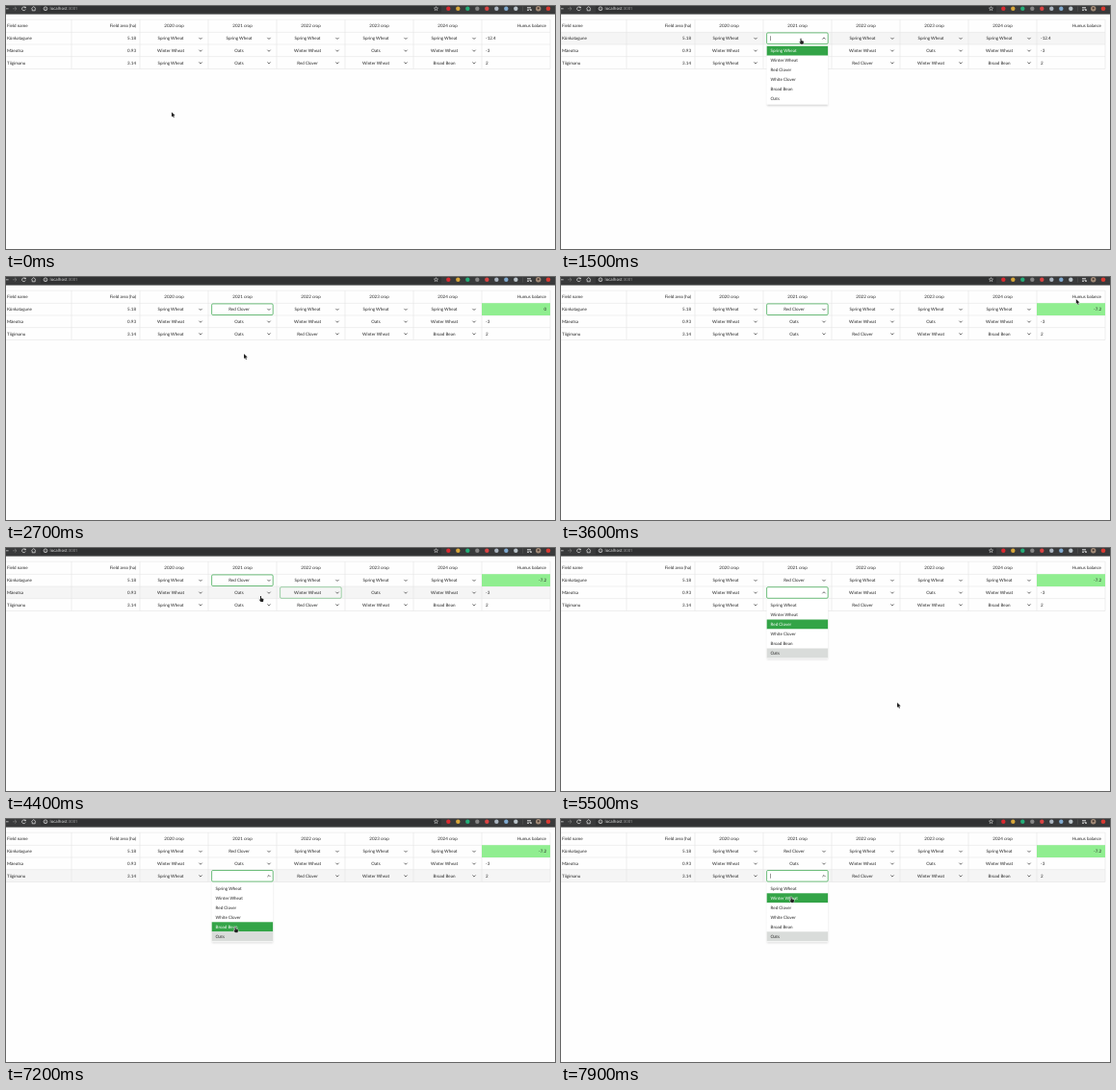
These frames come from a looping animation (570x253 px, 8 s). An HTML page with a canvas:

```html
<!DOCTYPE html>
<html lang="en">
<head>
<meta charset="utf-8">
<title>Crop rotation table</title>
<style>
  html, body { margin: 0; width: 100%; height: 100%; overflow: hidden; background: #fefefe; }
  canvas { display: block; width: 570px; height: 253px; }
</style>
</head>
<body>
<canvas id="stage"></canvas>
<script>
const W = 570, H = 253, LOOP = 8000, STEP = 100;
const canvas = document.getElementById('stage');
const ctx = canvas.getContext('2d');
const ratio = window.devicePixelRatio || 1;
canvas.width = W * ratio;
canvas.height = H * ratio;
ctx.scale(ratio, ratio);

const LATO = '4.5px Lato, sans-serif';
const INK = '#262626', GREEN = '#33a447', LINE = '#e5e5e5', LIGHT = '#e6e6e6';
const CROPS = ['Spring Wheat', 'Winter Wheat', 'Red Clover', 'White Clover', 'Broad Bean', 'Oats'];
const [SPRING, WINTER, RED, , BEAN, OATS] = CROPS.keys();
const ROWS = [
  { name: 'Künkatagune', area: '5.18', humus: '-12.4', crops: [SPRING, SPRING, SPRING, SPRING, SPRING] },
  { name: 'Mäeotsa', area: '0.93', humus: '-3', crops: [WINTER, OATS, WINTER, OATS, WINTER] },
  { name: 'Tiigimanu', area: '3.14', humus: '2', crops: [SPRING, OATS, RED, WINTER, BEAN] }
];
const ROW_H = 12.8, ROWS_TOP = 27.2, COL_W = 71, RIGHT = 565;
const colX = i => 139 + COL_W * i;
const rowY = r => ROWS_TOP + ROW_H * r;
const midY = r => rowY(r) + 6.5;
const itemY = (row, i) => midY(row) + 13 + 10 * i;

// Open menus: row, start, end and caret phase in ms.
const MENUS = [
  { row: 0, from: 1500, to: 2500, caret: 1500 },
  { row: 1, from: 5000, to: 5700, caret: 4960 },
  { row: 2, from: 6300, to: LOOP, caret: 6420 }
];
const PICKED = 2500, COUNT_START = 2800, COUNT_TIME = 1000;

const at = (x, y) => ({ x, y });
const onSelect = row => at(249, midY(row));
const onItem = (row, i, x = 238) => at(x, itemY(row, i));
const smooth = k => k * k * (3 - 2 * k);

// The pointer first circles the empty page, then eases from stop to stop.
const CIRCLE_TIME = 900;
function circle(k) {
  const angle = 3.71 - 5.5 * k, r = 0.9 + 0.1 * Math.sin(Math.PI * k);
  return at(291 + 157 * r * Math.cos(angle), 155 + 92 * r * Math.sin(angle));
}
const MOVES = [
  { from: 900, to: 1100, end: onSelect(0) },
  { from: 1500, to: 1900, end: onItem(0, RED) },
  { from: 2400, to: 2700, end: at(247, 80) },
  { from: 2800, to: 3700, end: at(545, 21) },
  { from: 3800, to: 4500, end: at(248, 51.7) },
  { from: 4500, to: 4700, end: at(270, 49) },
  { from: 4900, to: 5000, end: onItem(1, RED, 268) },
  { from: 5200, to: 5500, end: at(349, 161) },
  { from: 5600, to: 6100, end: onSelect(2) },
  { from: 6200, to: 6500, end: at(247, 89) },
  { from: 6500, to: 6900, end: onItem(2, BEAN) },
  { from: 7200, to: 7600, end: at(239, 81) }
];

function pointer(t) {
  if (t < CIRCLE_TIME) return circle(Math.max(t, 0) / CIRCLE_TIME);
  let p = circle(1);
  for (const { from, to, end } of MOVES) {
    if (t <= from) break;
    const k = smooth(Math.min(1, (t - from) / (to - from)));
    p = at(p.x + (end.x - p.x) * k, p.y + (end.y - p.y) * k);
  }
  return p;
}

const menuAt = t => MENUS.find(m => t >= m.from && t < m.to);

function itemUnder(p, menu) {
  if (p.x < 213 || p.x > 277.5) return -1;
  const i = Math.floor((p.y - itemY(menu.row, 0) + 5) / 10);
  return i < CROPS.length ? i : -1;
}

function rowUnder(p, menu) {
  if (menu && itemUnder(p, menu) >= 0) return menu.row;
  const r = Math.floor((p.y - ROWS_TOP) / ROW_H);
  return p.x < RIGHT && r >= 0 && r < ROWS.length ? r : -1;
}

function selectUnder(p) {
  const row = rowUnder(p), col = Math.floor((p.x - colX(0)) / COL_W);
  const dx = p.x - colX(col);
  return row >= 0 && col >= 0 && col < 5 && dx > 3.5 && dx < 67.5 ? { row, col } : null;
}

// The highlight stays on the last item the pointer touched.
function activeItem(menu, t) {
  let active = ROWS[menu.row].crops[1];
  for (let s = menu.from; s < t; s += STEP) {
    const i = itemUnder(pointer(s), menu);
    if (i >= 0) active = i;
  }
  return active;
}

function text(str, x, y, align = 'left', color = INK, font = LATO) {
  ctx.font = font;
  ctx.textAlign = align;
  ctx.fillStyle = color;
  ctx.fillText(str, x, y + 1.6);
}

function rect(x, y, w, h, color) {
  ctx.fillStyle = color;
  ctx.fillRect(x, y, w, h);
}

function dot(x, y, r, color) {
  ctx.fillStyle = color;
  ctx.beginPath();
  ctx.arc(x, y, r, 0, 7);
  ctx.fill();
}

function ring(x, y, r, from = 0, to = 7) {
  ctx.strokeStyle = LIGHT;
  ctx.lineWidth = 0.7;
  ctx.beginPath();
  ctx.arc(x, y, r, from, to);
  ctx.stroke();
}

function stroke(points, color = LIGHT, width = 0.7) {
  ctx.strokeStyle = color;
  ctx.lineWidth = width;
  ctx.beginPath();
  points.forEach(([x, y]) => ctx.lineTo(x, y));
  ctx.stroke();
}

function chevron(x, y, dir) {
  stroke([[x - 1.6, y - 0.8 * dir], [x, y + 0.8 * dir], [x + 1.6, y - 0.8 * dir]], '#444', 0.8);
}

function star(x, y) {
  const points = Array.from({ length: 11 }, (_, i) => {
    const a = i * Math.PI / 5 - Math.PI / 2, r = i % 2 ? 1 : 2.2;
    return [x + r * Math.cos(a), y + r * Math.sin(a)];
  });
  stroke(points, LIGHT, 0.5);
}

function toolbar() {
  const y = 2.8;
  rect(0, 0, W, 8.6, '#393a3b');
  rect(36, 0, 416, 6.6, '#303132');
  stroke([[-1, y], [2.6, y]]);
  stroke([[7, y], [11, y], [9.2, y - 1.8], [11, y], [9.2, y + 1.8]], '#777');
  ring(18.5, y, 1.9, 0.4, 5.5);
  rect(19.3, 0.8, 1.4, 1.4, LIGHT);
  stroke([[26.3, y], [28.7, 0.6], [31.1, y]]);
  stroke([[27.2, y], [27.2, 4.8], [30.2, 4.8], [30.2, y]]);
  ring(41, y, 1.9);
  rect(40.7, 2.3, 0.6, 1.5, LIGHT);

  const font = '4.3px "Open Sans", sans-serif';
  text('localhost', 45.6, 2.7, 'left', '#eee', font);
  text(':3001', 45.6 + ctx.measureText('localhost').width, 2.7, 'left', '#a2a2a2', font);

  star(446.5, y);
  const badges = ['#d9292f', '#d8a63a', '#23ad78', '#858585', '#d94444', '#aab4c0', '#7fa9cf', '#b9c2c8'];
  badges.forEach((color, i) => dot(459.3 + 10 * i, y, 2.2, color));
  rect(536.3, 0.5, 0.4, 5, '#666');
  for (let i = 0; i < 3; i++) rect(541, 1.2 + 1.5 * i, i < 2 ? 4 : 2, 0.7, LIGHT);
  dot(545, 4.1, 0.9, LIGHT);
  dot(552.7, y, 2.7, '#a38b78');
  dot(552.7, y - 0.5, 1.1, '#4b3932');
  dot(563, y, 2.3, '#d83a32');
}

function humusText(t) {
  const k = Math.min(1, Math.max(0, (t - COUNT_START) / COUNT_TIME));
  const eased = k && 1 - 2 ** (-10 * k);
  return String(Math.round(-72 * eased) / 10 || 0);
}

function table(t, hoverRow) {
  if (hoverRow >= 0) rect(0, rowY(hoverRow), RIGHT, ROW_H, '#f5f5f5');
  rect(0, 13.8, RIGHT, 0.6, LINE);
  for (let r = 0; r <= ROWS.length; r++) rect(0, rowY(r) - 0.3, RIGHT, 0.6, LINE);
  for (let i = -1; i <= 6; i++) rect(colX(i) - 0.3, 14, 0.6, rowY(3) - 14, LINE);
  if (t >= PICKED) rect(colX(5), rowY(0), COL_W, ROW_H, '#90ee90');

  text('Field name', 1, 20.6);
  text('Field area (ha)', 135, 20.6, 'right');
  for (let i = 0; i < 5; i++) text(`${2020 + i} crop`, colX(i) + 35.5, 20.6, 'center');
  text('Humus balance', 561, 20.6, 'right');

  ROWS.forEach((row, r) => {
    const y = midY(r);
    text(row.name, 1, y);
    text(row.area, 135, y, 'right');
    row.crops.forEach((crop, c) => {
      const shown = r === 0 && c === 1 && t >= PICKED ? RED : crop;
      text(CROPS[shown], colX(c) + 32, y, 'center');
      chevron(colX(c) + 63, y, 1);
    });
    if (r === 0 && t >= PICKED) text(humusText(t), 561, y, 'right');
    else text(row.humus, 498, y);
  });
}

function selectBox({ row, col }, width, fill) {
  ctx.beginPath();
  ctx.roundRect(colX(col) + 3.6, midY(row) - 5.8, 63.6, 11.6, 1.2);
  if (fill) {
    ctx.fillStyle = fill;
    ctx.fill();
  }
  ctx.strokeStyle = GREEN;
  ctx.lineWidth = width;
  ctx.stroke();
}

function dropdown({ row, caret, ...times }, t) {
  const y = midY(row), active = activeItem({ row, ...times }, t);
  ctx.save();
  ctx.shadowColor = 'rgba(0,0,0,.18)';
  ctx.shadowBlur = 2 * ratio;
  ctx.shadowOffsetY = 0.8 * ratio;
  rect(213.5, y + 6, 63.8, 63, '#fff');
  ctx.restore();
  CROPS.forEach((crop, i) => {
    const cy = itemY(row, i);
    const fill = i === active ? GREEN : i === ROWS[row].crops[1] ? '#d9dcda' : '#fff';
    rect(213.7, cy - 5, 63.4, 10, fill);
    text(crop, 217.6, cy, 'left', i === active ? '#fff' : INK);
  });
  selectBox({ row, col: 1 }, 0.7, '#fff');
  chevron(273, y, -1);
  if (Math.floor((t - caret) / 530) % 2 === 0) rect(217.2, y - 2.5, 0.5, 5, '#333');
}

function drawPointer({ x, y }, hand) {
  const arrow = [[0, 0], [0, 5], [1.2, 4], [2, 5.9], [2.9, 5.5], [2.1, 3.7], [3.7, 3.6]];
  const finger = [[-0.5, 0], [0.5, 0], [0.6, 2.2], [3, 3], [2.6, 6], [0, 6], [-1.8, 3.6], [-0.5, 3.8]];
  ctx.beginPath();
  (hand ? finger : arrow).forEach(([dx, dy]) => ctx.lineTo(x + dx, y + dy));
  ctx.closePath();
  ctx.lineJoin = 'round';
  ctx.strokeStyle = '#fff';
  ctx.lineWidth = 0.8;
  ctx.stroke();
  ctx.fillStyle = '#222';
  ctx.fill();
}

function draw(t) {
  const p = pointer(t), menu = menuAt(t);
  ctx.textRendering = 'geometricPrecision';
  rect(0, 0, W, H, '#fefefe');
  toolbar();
  table(t, rowUnder(p, menu));

  const hovered = menu ? null : selectUnder(pointer(t - STEP));
  if (hovered) selectBox(hovered, 0.45);
  if (t >= PICKED && t < MENUS[1].from) selectBox({ row: 0, col: 1 }, 0.7);
  if (menu) dropdown(menu, t);
  // Over a list the hand appears once the highlight has caught up.
  const item = menu ? itemUnder(p, menu) : -1;
  drawPointer(p, item >= 0 ? item === activeItem(menu, t) : selectUnder(p));
}

const start = performance.now();
function frame() {
  const t = (performance.now() - start) % LOOP;
  draw(Math.floor(t / STEP) * STEP);
  requestAnimationFrame(frame);
}
frame();
</script>
</body>
</html>
```
